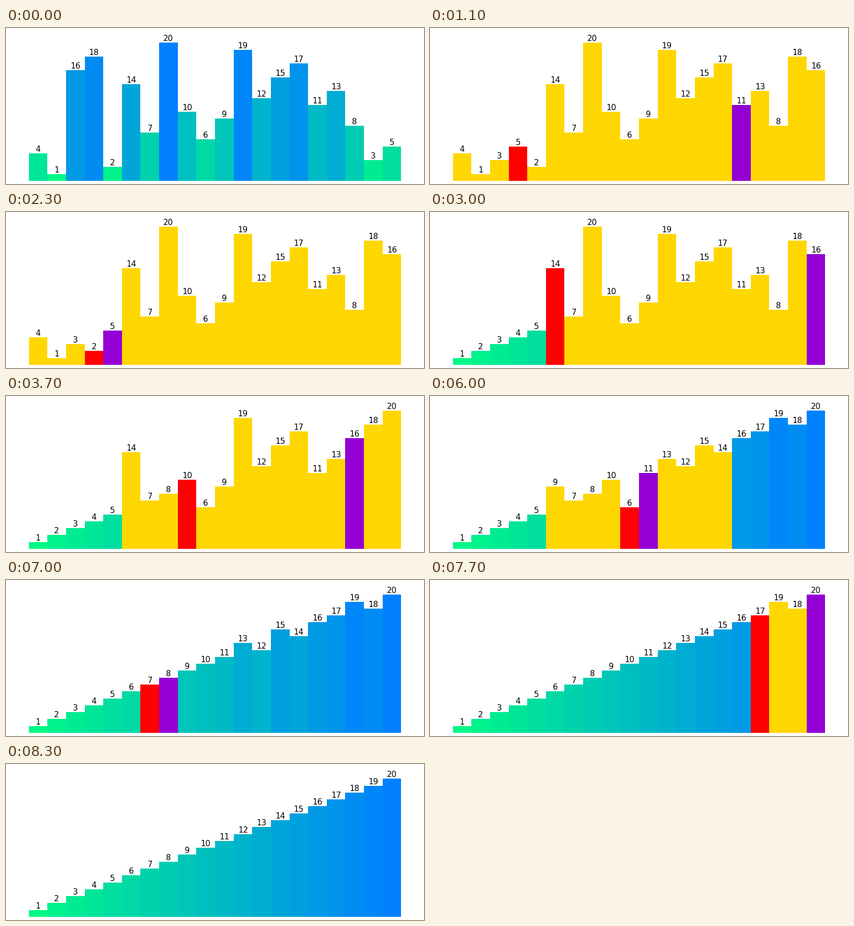
Write a matplotlib script that moves like this. It is 800x300 px and loops after 8.4 s.

```python
import matplotlib.pyplot as plt
from matplotlib.animation import FuncAnimation

VALUES = [4, 1, 16, 18, 2, 14, 7, 20, 10, 6, 9, 19, 12, 15, 17, 11, 13, 8, 3, 5]
N = len(VALUES)
STEP_MS = 100


def value_color(v):
    """Spring green for small values, azure for large ones."""
    t = v / (2 * N)
    return (0, 1 - t, 0.5 + t)


def quicksort(a, lo, hi):
    """Sort in place, yielding (values, lo, hi, i, j) for every step."""
    if lo >= hi:
        return
    i, j = lo, hi
    pivot_right = True  # the pivot sits at j, otherwise at i
    while i < j:
        yield a[:], lo, hi, i, j
        if a[i] > a[j]:
            a[i], a[j] = a[j], a[i]
            yield a[:], lo, hi, i, j
            pivot_right = not pivot_right
        if pivot_right:
            i += 1
        else:
            j -= 1
    yield from quicksort(a, lo, i - 1)
    yield from quicksort(a, i + 1, hi)


def bar_color(k, v, lo, hi, i, j):
    if k == i:
        return "red"
    if k == j:
        return "darkviolet"
    if lo <= k <= hi:
        return "gold"
    return value_color(v)


IDLE = (N, -1, -1, -1)  # empty range, no markers
work = VALUES[:]
steps = [(VALUES, *IDLE), *quicksort(work, 0, N - 1), (work, *IDLE)]

fig = plt.figure(figsize=(8, 3), dpi=100, facecolor="white")
ax = fig.add_axes([0.01, 0.02, 0.98, 0.93])
ax.set_xlim(-1.5, N + 0.5)
ax.set_ylim(0, N * 1.05)
ax.axis("off")

bars = ax.bar(range(N), VALUES, width=1)
labels = [
    ax.text(k, v, str(v), ha="center", va="bottom",
            family="DejaVu Sans", fontsize=11, color="black")
    for k, v in enumerate(VALUES)
]


def draw(n):
    values, *state = steps[n]
    for k, (v, bar, label) in enumerate(zip(values, bars, labels)):
        bar.set_height(v)
        bar.set_facecolor(bar_color(k, v, *state))
        label.set_y(v)
        label.set_text(str(v))
    return [*bars, *labels]


anim = FuncAnimation(fig, draw, frames=len(steps), interval=STEP_MS,
                     repeat=True, cache_frame_data=False)
plt.show()
```
